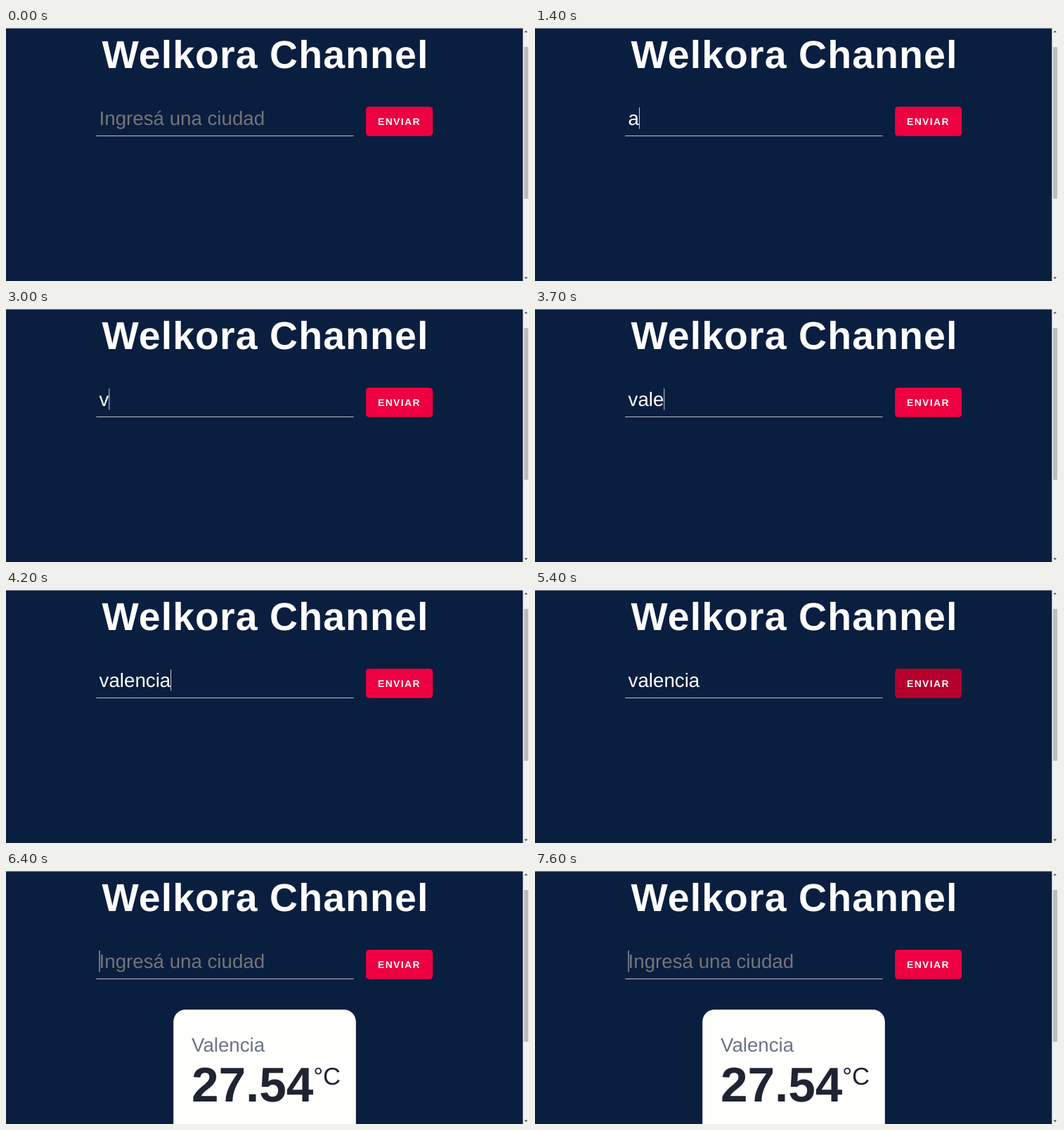
These frames come from a looping animation (744x360 px, 8000 ms). An HTML page:

```html
<!DOCTYPE html>
<html lang="es">
<head>
<meta charset="utf-8">
<title>Clima</title>
<style>
  html, body { margin: 0; width: 100%; height: 100%; overflow: hidden; background: #0a1e40; }
  svg { display: block; width: 744px; height: 360px; }
  text {
    font-family: "Liberation Sans", Arial, sans-serif;
    text-rendering: geometricPrecision;
    white-space: pre;
  }
  .title { font-size: 55.4px; font-weight: 700; letter-spacing: .02em; text-anchor: middle; fill: #fff; }
  .field { font-size: 27.7px; fill: #fff; }
  #hint { fill: #757575; }
  .label { font-size: 13.86px; font-weight: 700; letter-spacing: .1em; fill: #fff; }
  .city { font-size: 27.7px; fill: #6a7484; }
  .temp { font-size: 69.3px; font-weight: 700; fill: #1e2432; }
  .unit { font-size: 34.6px; fill: #1e2432; }
</style>
</head>
<body>
<svg viewBox="0 0 744 360">
  <rect width="744" height="360" fill="#0a1e40"/>
  <rect width="744" height="1" fill="#858d9b"/>

  <text class="title" x="368.9" y="56.7">Welkora Channel</text>

  <text class="field" id="hint" x="132.6" y="138">Ingresá una ciudad</text>
  <text class="field" id="typed" x="132.6" y="138"></text>
  <rect id="caret" y="113" width=".87" height="30.6" fill="#e4e7ec"/>
  <rect x="128.3" y="153.1" width="366.2" height=".87" fill="#d8dbe0"/>

  <rect id="button" x="512.1" y="112.1" width="95" height="41.7" rx="4.3"/>
  <text class="label" x="529.1" y="137.8">ENVIAR</text>

  <g id="card">
    <rect x="238.2" y="197.3" width="259.6" height="200" rx="17.3" fill="#fffffd"/>
    <text class="city" x="264" y="257.4">Valencia</text>
    <text class="temp" x="263.9" y="327.8">27.54</text>
    <text class="unit" x="437.2" y="304">°C</text>
  </g>

  <g>
    <rect x="735.3" width="8.7" height="360" fill="#f1f1f1"/>
    <rect x="736.8" y="27" width="6.2" height="216" fill="#bdbdbd"/>
    <path d="M737.2 6.3h5l-2.5-2.6zM737.2 354.6h5l-2.5 2.6z" fill="#505050"/>
  </g>
</svg>
<script>
  const LOOP = 8000, LEFT = 132.6;
  const [hint, typed, caret, button, card] =
    ["hint", "typed", "caret", "button", "card"].map(id => document.getElementById(id));

  // [start in ms, value]
  const words = [
    [0, ""], [1400, "a"], [2100, ""], [3000, "v"], [3300, "va"],
    [3600, "val"], [3700, "vale"], [3800, "valen"],
    [4000, "valenc"], [4100, "valenci"], [4200, "valencia"], [5600, ""]
  ];
  const blinks = [
    [0, false], [100, true], [700, false], [1300, true], [2000, false],
    [2100, true], [2700, false], [3000, true], [4800, false],
    [6400, true], [7000, false], [7600, true]
  ];

  const at = (steps, t) => steps.filter(([start]) => start <= t).pop()[1];
  const show = (el, on) => el.setAttribute("visibility", on ? "visible" : "hidden");

  function draw(t) {
    const word = at(words, t);
    if (typed.textContent !== word) typed.textContent = word;
    const width = word ? typed.getComputedTextLength() : 0;
    caret.setAttribute("x", LEFT + width);
    show(caret, at(blinks, t));
    show(hint, !word);
    show(card, t >= 5600);
    button.setAttribute("fill", t >= 5000 && t < 6000 ? "#b4002c" : "#ee0040");
  }

  const origin = performance.now();
  function tick() {
    draw((performance.now() - origin) % LOOP);
    requestAnimationFrame(tick);
  }
  tick();
</script>
</body>
</html>
```
